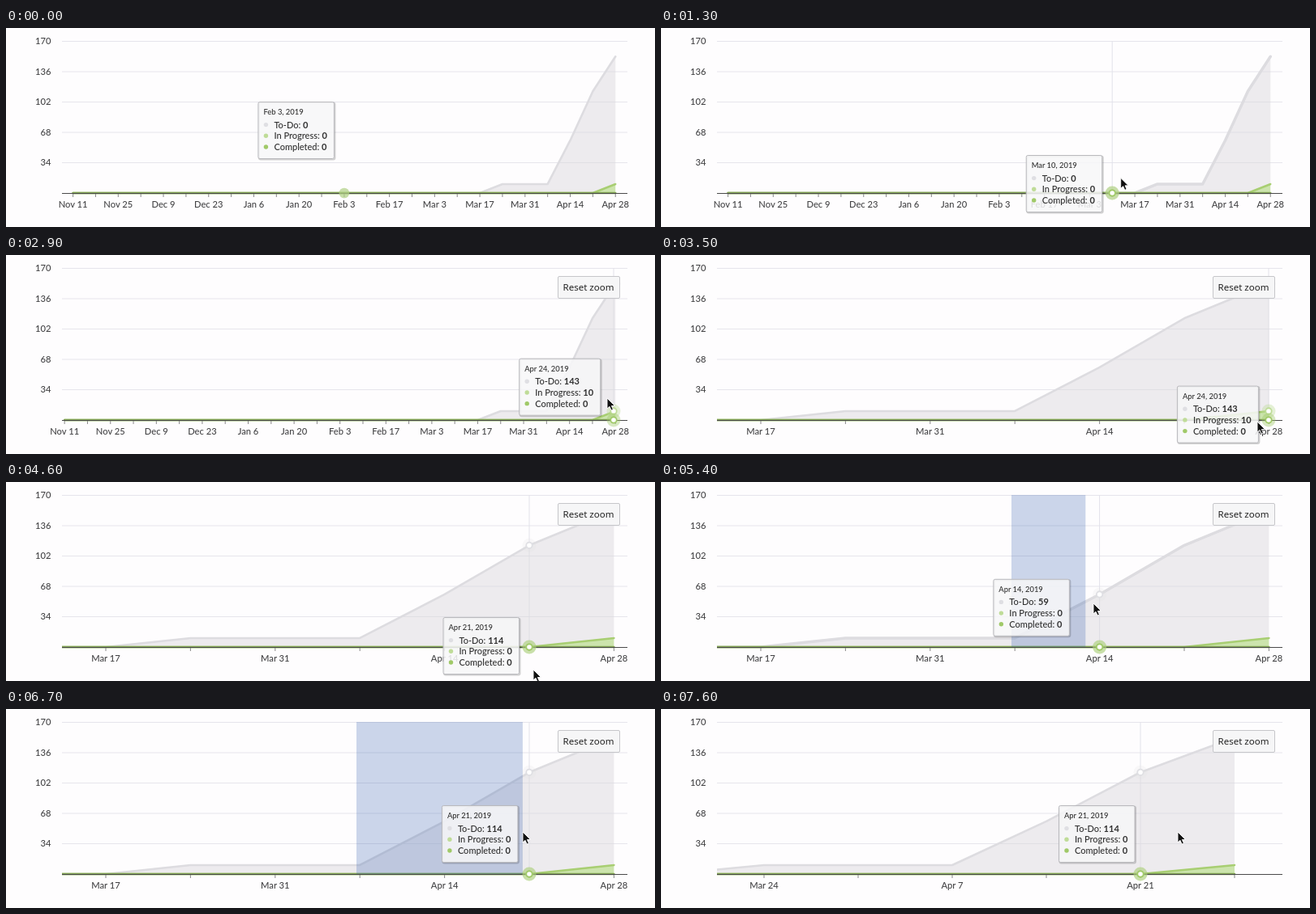
Recreate the animation shown at these times as an HTML page. Size 800 px wide and 246 px high, loop 8 s.

```html
<!DOCTYPE html>
<html lang="en">
<head>
<meta charset="utf-8">
<title>Zoomable task chart</title>
<style>
  html, body { margin: 0; width: 100%; height: 100%; overflow: hidden; background: #fefdfe; }
  svg { display: block; width: 800px; height: 246px; }
  text { font: 500 11.2px Lato, sans-serif; fill: #444446; white-space: pre; }
  .mid { text-anchor: middle; }
  .end { text-anchor: end; }
  .grid { stroke: #e6e5ec; }
  .axis { stroke: #4a4a4a; stroke-width: 1.1; }
  .tick { stroke: #8a8a8a; }
  .cross { stroke: #e2e2ea; }
  .line { fill: none; stroke-linejoin: round; stroke-linecap: round; stroke-width: 2.5; }
  .tip text { font-size: 11px; fill: #303030; }
  .tip .head { font-size: 9.4px; }
  .tip .val { font-weight: 700; }
  .box { fill: #f7f7f8; fill-opacity: .86; stroke: #b9b9bd; }
  .shade { fill: none; stroke: #000; stroke-opacity: .18; stroke-width: 2; }
  .reset text { font: 500 11.5px "Noto Sans", "Open Sans", sans-serif; fill: #222; }
</style>
</head>
<body>
<svg viewBox="0 0 800 246">
  <defs><clipPath id="plot"><rect x="69" y="10" width="697" height="198"/></clipPath></defs>
  <g id="grid"></g>
  <line id="cross" class="cross" y1="16" y2="204"/>
  <g clip-path="url(#plot)">
    <path id="todoFill" fill="#d8d6da" fill-opacity=".47"/>
    <path id="todoLine" class="line" stroke="#dddce0"/>
    <path id="workFill" fill="#a5d06c" fill-opacity=".55"/>
    <path id="workLine" class="line" stroke="#a8ce72"/>
    <path id="doneLine" class="line" stroke="#84a656"/>
  </g>
  <line class="axis" x1="69" x2="766" y1="204.5" y2="204.5"/>
  <g id="ticks"></g>
  <g id="marks"></g>
  <rect id="select" y="16" height="188" fill="#335cad" fill-opacity=".25"/>
  <g id="tip" class="tip">
    <rect class="shade" x="1.5" y="1.5" height="70" rx="2"/>
    <rect class="box" x=".5" y=".5" height="70" rx="2"/>
    <text class="head" x="7" y="16.3"></text>
  </g>
  <g id="reset" class="reset">
    <rect x="680.5" y="26.5" width="76" height="27" rx="1.5" fill="#f6f6f7" stroke="#c6c6ca"/>
    <text class="mid" x="718" y="44.2">Reset zoom</text>
  </g>
  <path id="cursor" d="M0 0V13L3 10.3L5.1 15L7.4 14L5.4 9.5H9.5Z" fill="#111" stroke="#fff" stroke-width=".9"/>
</svg>
<script>
const LOOP = 8000, STEP = 100, FADE = 500, ZOOM = 500;
const LEFT = 69, RIGHT = 766, BASE = 204, LAST = 24;
const todo = w => w < 19 ? 0 : w < 22 ? 10 : [59, 114, 143][w - 22];
const work = w => w === LAST ? 10 : 0;
const total = w => todo(w) + work(w);
const yOf = v => BASE - v * 37.5 / 34;

// x of week 0 and width of a week, for each zoom level
const views = [[82.6, 27.86], [-1756.2, 104.4], [-2077, 116]];

// pointer visits: path points are time, x, y
const visits = [
  { from: 0, gone: 0, path: [[0, 417, 124]] },
  { from: 1200, gone: 3750, path: [
    [1200, 560, 190], [1500, 580, 176], [2000, 655, 177], [2500, 740, 160],
    [2800, 748, 160], [2900, 741, 177], [3500, 735, 206]] },
  { from: 4600, gone: Infinity, path: [
    [4600, 650, 232], [4900, 436, 152], [5400, 533, 150], [6300, 636, 152], [6700, 637, 152]] }
];
const drags = [{ from: 1500, to: 2900, x: 584 }, { from: 4900, to: 7000, x: 432 }];

const $ = id => document.getElementById(id);
const clamp = v => Math.max(0, Math.min(1, v));
const mix = (a, b, p) => a + (b - a) * p;
const ease = p => (1 - Math.cos(Math.PI * clamp(p))) / 2;

function set(el, attrs) {
  for (const k in attrs) el.setAttribute(k, attrs[k]);
}
function add(parent, tag, attrs, text) {
  const el = document.createElementNS("http://www.w3.org/2000/svg", tag);
  set(el, attrs);
  if (text !== undefined) el.textContent = text;
  return parent.appendChild(el);
}
function show(el, on) {
  el.setAttribute("visibility", on ? "visible" : "hidden");
}
function dateOf(w, withYear) {
  const day = new Date(Date.UTC(2018, 10, 11 + 7 * w - (withYear && w === LAST ? 4 : 0)));
  const name = day.toLocaleDateString("en-US", { month: "short", day: "numeric", timeZone: "UTC" });
  return withYear ? name + ", " + day.getUTCFullYear() : name;
}

function pointer(path, t) {
  const i = path.findIndex(k => k[0] > t);
  if (i < 1) return path[i ? path.length - 1 : 0].slice(1);
  const [a, b] = [path[i - 1], path[i]], p = (t - a[0]) / (b[0] - a[0]);
  return [mix(a[1], b[1], p), mix(a[2], b[2], p)];
}
function viewAt(t) {
  const z1 = ease((t - 2876) / ZOOM), z2 = ease((t - 6980) / ZOOM);
  const [x0, dx] = [0, 1].map(i => mix(mix(views[0][i], views[1][i], z1), views[2][i], z2));
  return { z1, z2, xOf: w => x0 + dx * w, weekOf: x => Math.min(LAST, Math.round((x - x0) / dx)) };
}
const tipWidth = w => w === LAST ? 101 : 94.5;

// the hovered week and the tooltip's goal trail the pointer by one step
function hover(visit, t) {
  const [x, y] = pointer(visit.path, t - STEP), view = viewAt(t);
  const week = view.weekOf(x), px = Math.min(view.xOf(week), 749);
  return { week, px, goal: [px - 12 - tipWidth(week), Math.min(y - 33, 167)] };
}
// the tooltip covers 45% of its remaining way on each step
function tipAt(visit, t) {
  const pos = hover(visit, visit.from).goal;
  for (let s = visit.from; s <= t; s += STEP) {
    hover(visit, s).goal.forEach((g, i) => { pos[i] = mix(pos[i], g, .45); });
  }
  return pos;
}

for (let v = 34; v <= 170; v += 34) {
  const y = yOf(v);
  add($("grid"), "line", { class: "grid", x1: LEFT, x2: RIGHT, y1: y, y2: y });
  add($("grid"), "text", { class: "end", x: 55.5, y: y + 3.8 }, v);
}
const weeks = Array.from({ length: LAST + 1 }, (_, w) => ({
  w,
  tick: add($("ticks"), "line", { class: "tick", y1: 205, y2: 209 }),
  label: add($("ticks"), "text", { class: "mid", y: 221.7 }, dateOf(w))
}));
const tones = ["#dfdfe3", "#bfdc98", "#a0c968"];
const marks = tones.map((tone, i) => ({
  halo: add($("marks"), "circle", { fill: tone, r: 8.5, "fill-opacity": i ? .4 : .2 }),
  dot: add($("marks"), "circle", { r: 3.7, fill: "#fff", stroke: tone, "stroke-width": 1.8 })
}));
const values = ["To-Do", "In Progress", "Completed"].map((name, i) => {
  const y = 32.6 + 13.7 * i;
  add($("tip"), "circle", { cx: 10, cy: y - 4, r: 2.7, fill: tones[i] });
  const row = add($("tip"), "text", { x: 20, y });
  add(row, "tspan", {}, name + ": ");
  return add(row, "tspan", { class: "val" });
});

function drawSeries({ xOf }, thick) {
  const path = f => "M" + weeks.map(({ w }) => xOf(w).toFixed(2) + " " + yOf(f(w)).toFixed(2)).join("L");
  const floor = `L${xOf(LAST - 1)} ${BASE}L${xOf(0)} ${BASE}Z`;
  set($("todoFill"), { d: path(total) + `L${xOf(LAST)} ${yOf(work(LAST))}` + floor });
  set($("todoLine"), { d: path(total), style: `stroke-width:${thick ? 3.5 : 2.6}` });
  set($("workFill"), { d: path(work) + `L${xOf(LAST)} ${BASE}` + floor });
  set($("workLine"), { d: path(work) });
  set($("doneLine"), { d: path(() => 0) });
}

function drawLabels({ xOf, z1, z2 }) {
  for (const { w, tick, label } of weeks) {
    const x = xOf(w), kept = w < 18 ? 1 - z1 : 1;
    set(tick, { x1: x, x2: x, opacity: kept });
    show(tick, x >= LEFT && x <= RIGHT);
    set(label, { x, opacity: kept * (w % 2 ? z2 : 1 - z2) });
    show(label, x > 45);
  }
}

function drawTip(week, [x, y], fade) {
  set($("tip"), { transform: `translate(${x} ${y})`, opacity: fade });
  for (const r of $("tip").querySelectorAll("rect")) set(r, { width: tipWidth(week) - 1 });
  $("tip").querySelector(".head").textContent = dateOf(week, true);
  [todo(week), work(week), 0].forEach((v, i) => { values[i].textContent = v; });
}

function render(t) {
  const view = viewAt(t);
  const visit = visits.filter(v => v.from <= t).pop();
  const inside = t < visit.gone - STEP;
  const fade = clamp(1 - (t - visit.gone) / FADE);
  const [cx, cy] = pointer(visit.path, t);
  const { week, px } = hover(visit, t);

  drawSeries(view, inside && Math.abs(cy - yOf(total(week))) < 20);
  drawLabels(view);
  drawTip(week, tipAt(visit, t), fade);

  set($("cross"), { x1: px, x2: px });
  show($("cross"), inside);
  [total(week), work(week), 0].forEach((v, i) => {
    const at = { cx: px, cy: yOf(v), opacity: fade };
    set(marks[i].halo, at);
    set(marks[i].dot, at);
    show(marks[i].dot, visit.gone > 0);
  });
  // the halo shrinks while it fades
  for (const { halo } of marks) set(halo, { r: visit.gone > 0 ? 8.5 : 6.3 });

  const drag = drags.find(d => t >= d.from && t < d.to);
  show($("select"), drag);
  if (drag) {
    const [end] = pointer(visit.path, t - STEP / 2);
    set($("select"), { x: drag.x, width: Math.max(0, end - drag.x) });
  }

  show($("reset"), t >= drags[0].to);
  set($("cursor"), { transform: `translate(${cx} ${cy})` });
  show($("cursor"), inside);
}

let start;
function frame(now) {
  start ??= now;
  render(Math.floor(((now - start) % LOOP) / STEP) * STEP);
  requestAnimationFrame(frame);
}
render(0);
requestAnimationFrame(frame);
</script>
</body>
</html>
```
